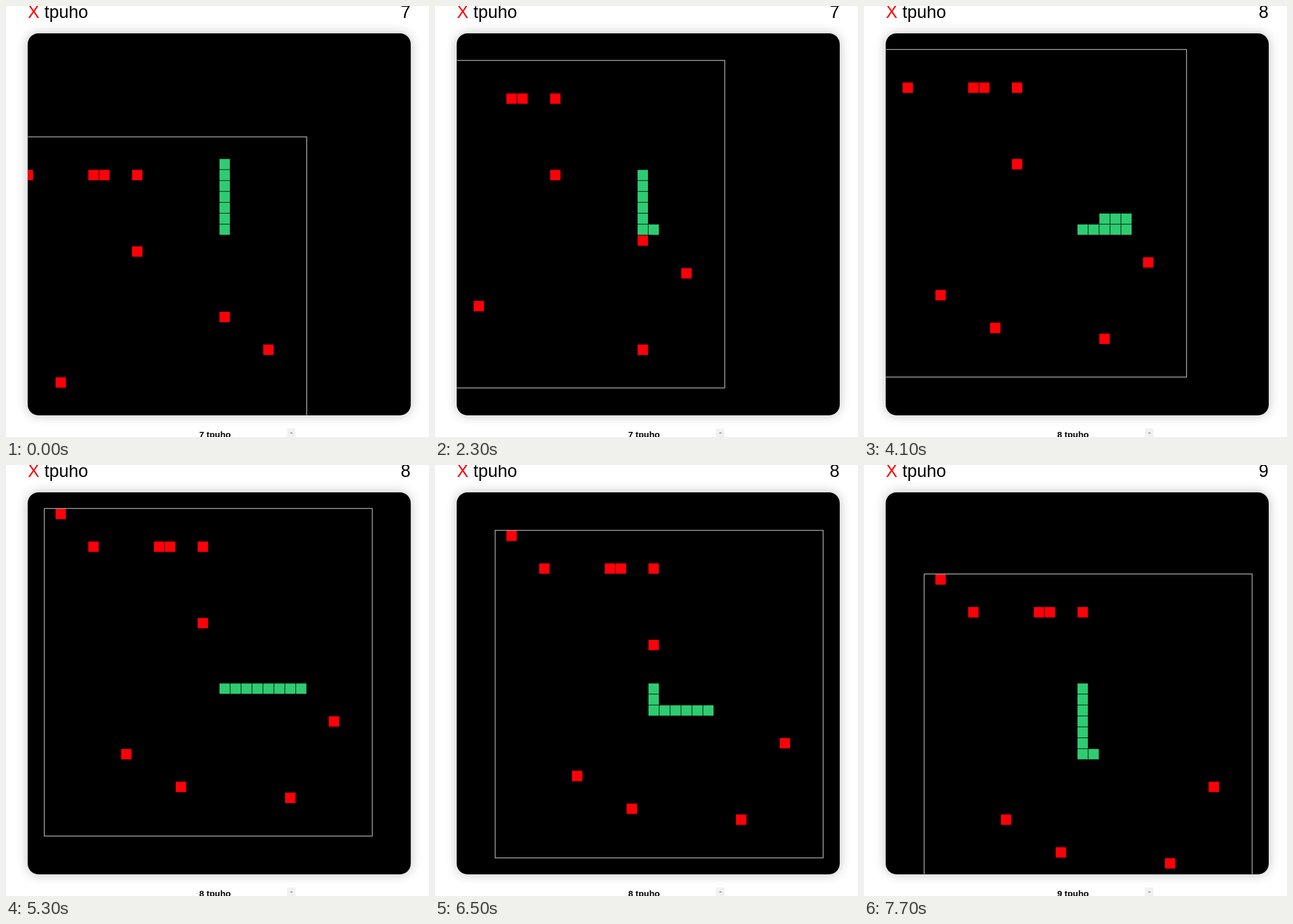
These frames come from a looping animation (741 by 756 pixels, 8 s). An HTML page with a canvas:

```html
<!DOCTYPE html>
<html lang="en">
<head>
<meta charset="utf-8">
<title>Snake</title>
<style>
  html, body { margin: 0; width: 741px; height: 756px; overflow: hidden; background: #fff; }
  body { position: relative; font-family: "Liberation Sans", Arial, sans-serif; color: #000; }
  .text { position: absolute; white-space: pre; }
  .big { top: -7px; font-size: 30.64px; line-height: 35px; }
  .big i { font-style: normal; color: #f00; }
  #name { left: 38.3px; }
  #score { right: 32.5px; }
  #row { left: 338.6px; top: 743px; font: bold 15.32px/18px "Liberation Sans", Arial, sans-serif; }
  #board {
    position: absolute; left: 38.4px; top: 47.6px; width: 670.25px; height: 670.25px;
    border-radius: 19px; background: #000; box-shadow: 0 0 19px rgba(0, 0, 0, .25);
  }
  #view { position: absolute; left: 0; top: 0; }
  #scroll { position: absolute; left: 492px; top: 741px; width: 15px; height: 15px; background: #f1f1f1; }
  #scroll::after {
    content: ""; position: absolute; left: 4.5px; top: 6px;
    border: solid transparent; border-width: 0 3px 3px; border-bottom-color: #a3a3a3;
  }
</style>
</head>
<body>
<div class="text big" id="name"><i>X</i> tpuho</div>
<div class="text big" id="score">7</div>
<div id="board"></div>
<canvas id="view" width="741" height="756"></canvas>
<div class="text" id="row">7 tpuho</div>
<div id="scroll"></div>
<script>
const LOOP = 8000, TICK = 300, FIRST = 200;
const CELL = 19.15, LEFT = 38.4, TOP = 47.6, VIEW = 35 * CELL;
const WORLD = 30, MID = 18, START = 7;

const moves = { U: [0, -1], D: [0, 1], L: [-1, 0], R: [1, 0] };
const lead = 6; // moves made before the loop begins
const route = "D".repeat(13) + "RRD" + "L".repeat(10) + "U".repeat(6);

const path = [[22, 2]];
for (const m of route) {
  const [x, y] = path[path.length - 1];
  path.push([x + moves[m][0], y + moves[m][1]]);
}

const food = [
  [1, 0], [4, 3], [10, 3], [11, 3], [14, 3], [14, 10],
  [22, 16], [26, 19], [7, 22], [22, 26]
].map(([x, y]) => ({ x, y, born: 0 }));
for (const f of food) {
  const i = path.findIndex(([x, y]) => x === f.x && y === f.y);
  f.eaten = i < 0 ? Infinity : i - lead;
}
food.push({ x: 12, y: 25, born: 12, eaten: Infinity });

const $ = id => document.getElementById(id);
const ctx = $("view").getContext("2d");
const eatenBy = step => food.filter(f => f.eaten <= step).length;

function square(x, y, color) {
  ctx.fillStyle = color;
  ctx.fillRect(x * CELL + .48, y * CELL + .48, CELL - .96, CELL - .96);
}

function draw(step) {
  const now = lead + step;
  const [hx, hy] = path[now];
  const length = START + eatenBy(step - 1);
  const score = START + eatenBy(step);

  ctx.clearRect(0, 0, 741, 756);
  ctx.save();
  ctx.beginPath();
  ctx.roundRect(LEFT, TOP, VIEW, VIEW, 19);
  ctx.clip();
  // the camera keeps the head's centre at the same spot
  ctx.translate(LEFT + (MID - .5 - hx) * CELL, TOP + (MID - .5 - hy) * CELL);
  for (const f of food)
    if (f.born <= step && step < f.eaten) square(f.x, f.y, "#ff0008");
  ctx.strokeStyle = "#a6a6a6";
  ctx.lineWidth = 1.5;
  ctx.strokeRect(0, 0, WORLD * CELL, WORLD * CELL);
  for (const [x, y] of path.slice(now - length + 1, now + 1)) square(x, y, "#2ecc71");
  ctx.restore();

  $("score").textContent = score;
  $("row").textContent = score + " tpuho";
}

let shown = -1;
function frame() {
  const t = performance.now() % LOOP;
  const step = Math.floor((t - FIRST) / TICK) + 1;
  if (step !== shown) draw(shown = step);
  requestAnimationFrame(frame);
}
frame();
</script>
</body>
</html>
```
